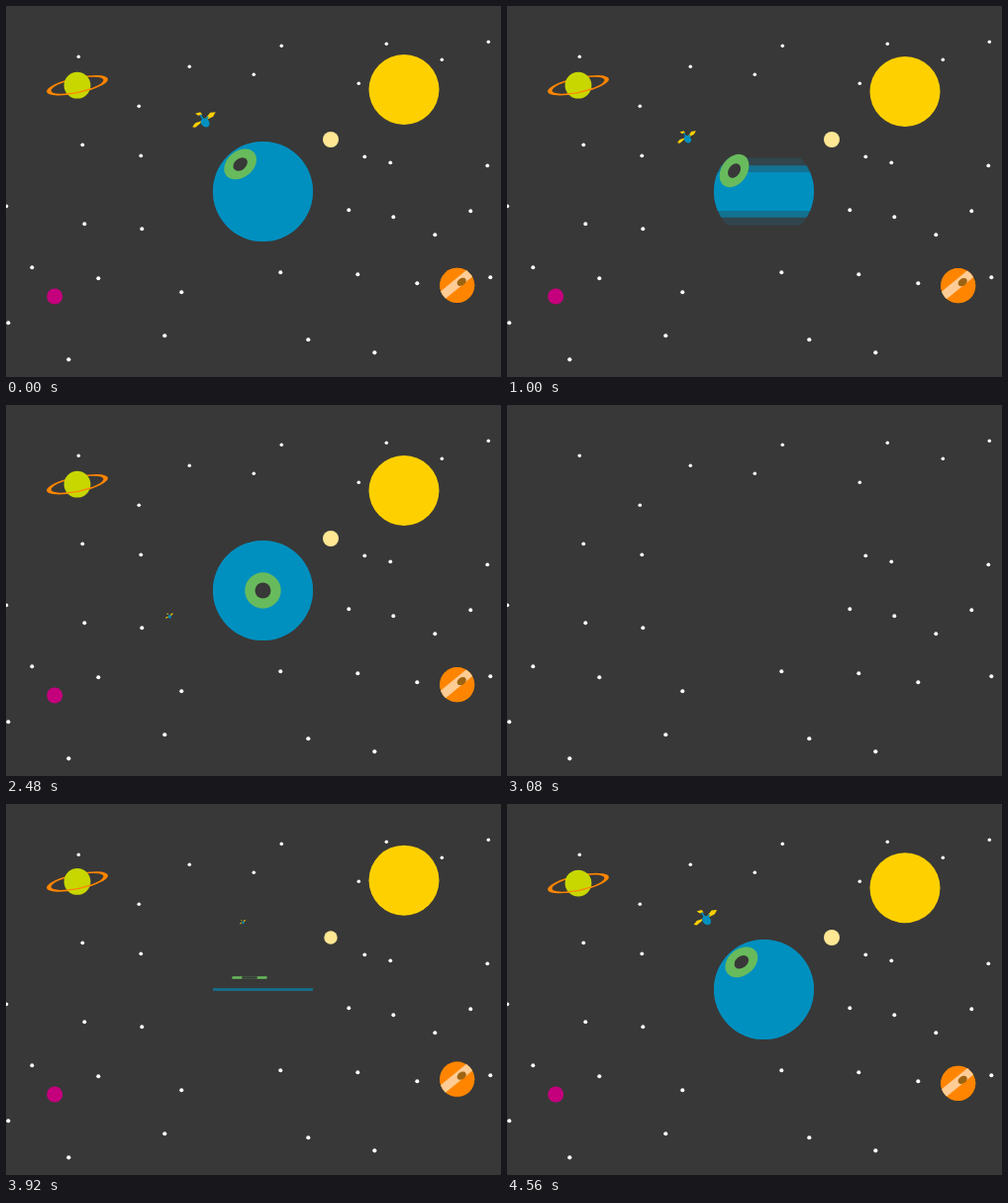
These frames come from a looping animation (500 px wide and 375 px high, 4600 ms). An HTML page:

```html
<!DOCTYPE html>
<html lang="en">
<head>
<meta charset="utf-8">
<title>Planets</title>
<style>
  html, body { margin: 0; width: 100%; height: 100%; overflow: hidden; background: #383838; }
  svg { display: block; width: 100vw; height: 100vh; }
</style>
</head>
<body>
<svg viewBox="0 0 500 375">
  <defs>
    <clipPath id="lidOuter"><rect x="-55" width="110"/></clipPath>
    <clipPath id="lidMid"><rect x="-55" width="110"/></clipPath>
    <clipPath id="lidInner"><rect x="-55" width="110"/></clipPath>
    <clipPath id="lidEye"><rect x="-55" width="110"/></clipPath>
    <clipPath id="disc"><circle r="17.6"/></clipPath>
    <g id="striped">
      <circle r="17.6" fill="#ff8500"/>
      <g clip-path="url(#disc)"><path d="M-17 12L16-15" stroke="#ffcc95" stroke-width="9"/></g>
      <ellipse cx="4.5" cy="-3.5" rx="5" ry="3.6" fill="#9c6412" transform="rotate(-35 4.5 -3.5)"/>
    </g>
  </defs>
  <g id="stars" fill="#fff"></g>
  <g id="scene">
    <circle id="sun" r="35.5" fill="#ffd000"/>
    <g id="ringed">
      <path transform="rotate(-12)" fill="#ff8500" fill-rule="evenodd" d="M-31.6 0a31.6 8 0 1 0 63.2 0a31.6 8 0 1 0-63.2 0zM-27 0a27 6.6 0 1 0 54 0a27 6.6 0 1 0-54 0z"/>
      <circle r="13.4" fill="#c8d700"/>
      <path transform="rotate(-12)" d="M-13.3 6.4A29.3 7.3 0 0 0 13.3 6.4" fill="none" stroke="#ff8500" stroke-width="1.3"/>
    </g>
    <circle id="pink" r="8" fill="#c4007d"/>
    <circle id="moon" r="8" fill="#ffe794"/>
    <g id="orange">
      <use id="now" href="#striped"/>
      <use id="before" href="#striped" opacity=".35"/>
      <use id="after" href="#striped" opacity=".35"/>
    </g>
    <g id="planet" fill="#0090bf">
      <g clip-path="url(#lidOuter)" opacity=".15"><circle r="50.5"/></g>
      <g clip-path="url(#lidMid)" opacity=".6"><circle r="50.5"/></g>
      <g clip-path="url(#lidInner)"><circle r="50.5"/></g>
      <g id="eye" clip-path="url(#lidEye)">
        <g id="iris">
          <circle r="18.2" fill="#68bb5c"/>
          <circle r="8" fill="#383838"/>
        </g>
      </g>
    </g>
    <g id="craft">
      <path fill="#ffd000" d="M2-3L6-8L11.5-8.5L9-4L3-1zM-12 6.5L-9 2.5L-3 .5L-4 3L-9 7zM-9-7L-4-8.5L-2-6L-6-5z"/>
      <path stroke="#0090bf" stroke-width="1.6" d="M-4-6L1 2M4-4L0 2"/>
      <ellipse cx="1" cy="2" rx="5" ry="4" fill="#0090bf" transform="rotate(50 1 2)"/>
    </g>
  </g>
</svg>
<script>
const LOOP = 4600, INTRO = 3080;
const HOME = { x: 259.5, y: 187.5 };
const BLINKS = [840, 2595];

const $ = id => document.getElementById(id);
const clamp = x => Math.min(1, Math.max(0, x));
const mix = (a, b, p) => a + (b - a) * p;

// progress of a move that starts at `from` and lasts `ms`
const easeOut = (u, from, ms) => 1 - (1 - clamp((u - from) / ms)) ** 2;
const easeBoth = (u, from, ms) => {
  const p = clamp((u - from) / ms);
  return p * p * (3 - 2 * p);
};

// damped swing that starts `amp` px above the resting place
const spring = (ms, amp, decay, period) =>
  -amp * Math.exp(-decay * ms / 1000) * Math.cos(2 * Math.PI * ms / period);

function place(id, x, y, scale = 1) {
  $(id).setAttribute('transform', `translate(${x} ${y}) scale(${scale})`);
}
function show(id, on) {
  $(id).style.display = on ? '' : 'none';
}
function setLid(id, half) {
  const slit = $(id).firstElementChild;
  slit.setAttribute('y', -half);
  slit.setAttribute('height', 2 * half);
}

// stars grow a little towards the bottom
const stars = [
  [73, 51], [185, 61], [278, 40], [250, 69], [384, 38], [440, 54], [487, 36], [356, 78],
  [134, 101], [77, 140], [136, 151], [362, 152], [388, 158], [486, 161], [0, 202], [346, 206],
  [391, 213], [469, 207], [433, 231], [79, 220], [137, 225], [26, 264], [93, 275], [177, 289],
  [277, 269], [355, 271], [415, 280], [489, 274], [2, 320], [160, 333], [305, 337], [372, 350],
  [63, 357]
];
$('stars').innerHTML = stars.map(([x, y]) =>
  `<circle cx="${x + 0.3}" cy="${y + 0.3}" r="${1.7 + y / 900}"/>`).join('');

// leaves the planet's rim, then circles it ever faster while shrinking away
function craftAt(u) {
  const s = (u - 1520) / 1000;
  const angle = (39.6 + 7.9 * s + 7.5 * s * s) * Math.PI / 180;
  const radius = 93 + 2 * s;
  const out = easeOut(u, 770, 500);
  return {
    x: mix(252, HOME.x - radius * Math.sin(angle), out),
    y: mix(121, HOME.y - radius * Math.cos(angle), out),
    scale: out * Math.sqrt(clamp(1 - s / 2.8))
  };
}

// rests up left, follows the craft, then looks straight ahead
function gazeAt(u, craft) {
  const watch = easeBoth(u, 900, 500);
  const follow = 0.385 * watch * (1 - easeBoth(u, 2950, 430));
  return {
    x: -13.5 * (1 - watch) + (craft.x - HOME.x) * follow,
    y: -12 * (1 - watch) + (craft.y - HOME.y) * follow
  };
}

function drawLids(u) {
  const gap = Math.min(...BLINKS.map(b => Math.abs(u - b)));
  const half = Math.max(1.2, gap * 0.365);
  setLid('lidOuter', half * 1.27);
  setLid('lidMid', half * 0.97);
  setLid('lidInner', (half - 1.2) * 0.76);
  setLid('lidEye', half);
}

function drawEye(gaze) {
  const turn = Math.atan2(gaze.y, gaze.x) * 180 / Math.PI;
  const squash = Math.sqrt(1 - (gaze.x ** 2 + gaze.y ** 2) / 2700);
  place('eye', gaze.x, gaze.y);
  $('iris').setAttribute('transform', `rotate(${turn}) scale(${squash} 1)`);
}

function drawOrange(u) {
  const y = ms => 282.7 + spring(ms - 340, 98, 4.8, 600);
  show('orange', u >= 360);
  place('now', 455.7, y(u));
  place('before', 455.7, y(u - 8));
  place('after', 455.7, y(u + 8));
}

function draw(t) {
  const u = (t - INTRO + LOOP) % LOOP;
  show('scene', u >= 80);

  place('sun', 402, 86.5 + spring(u - 60, 49, 2.1, 760));
  show('ringed', u >= 120);
  place('ringed', 72, 80.2 + spring(u - 120, 39, 3.4, 620));
  drawOrange(u);
  place('pink', 49.2, 293.5, easeOut(u, 100, 220));
  place('moon', 328, 135, easeOut(u, 710, 220));

  const grow = easeOut(u, 145, 480);
  place('planet', HOME.x - 11 * (1 - grow), HOME.y, grow);
  drawLids(u);

  const craft = craftAt(u);
  drawEye(gazeAt(u, craft));
  place('craft', craft.x, craft.y, craft.scale);
}

function frame() {
  draw(performance.now() % LOOP);
  requestAnimationFrame(frame);
}
frame();
</script>
</body>
</html>
```
